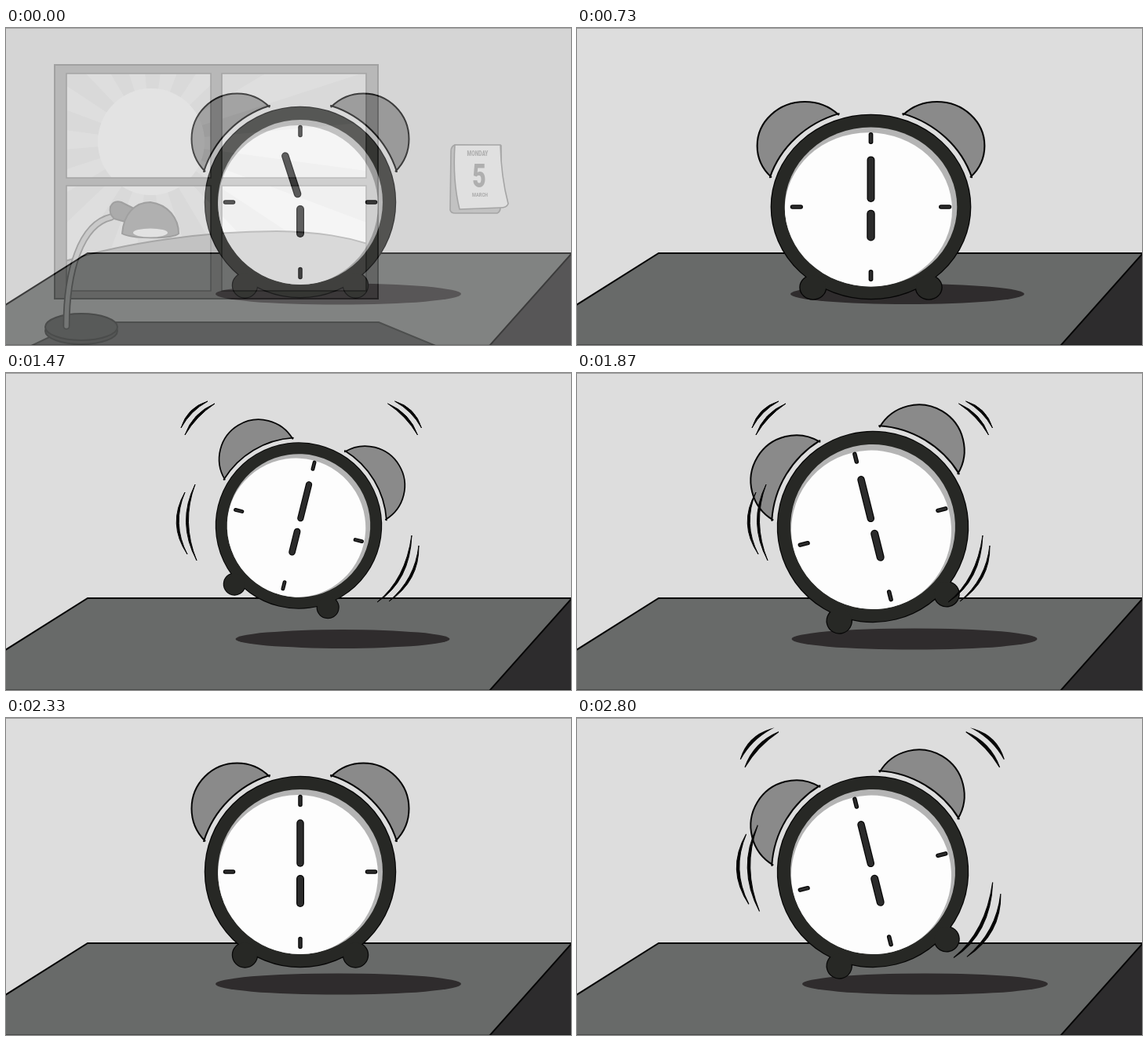
An HTML page with a canvas for the animation above (2870 ms loop, 720x404 px).

```html
<!DOCTYPE html>
<html lang="en">
<head>
<meta charset="utf-8">
<title>Ringing alarm clock</title>
<style>
  html, body { margin: 0; width: 100%; height: 100%; overflow: hidden; background: #ddd; }
  canvas { display: block; }
</style>
</head>
<body>
<canvas id="stage" width="720" height="404"></canvas>
<script>
const W = 720, H = 404, LOOP = 2870, TICK = 200 / 3;
const RAD = Math.PI / 180;
const INK = '#060606', BODY = '#272825';
const ctx = document.getElementById('stage').getContext('2d');

const grey = v => `rgb(${v},${v},${v})`;

function paint(c, fill, stroke, width = 2) {
  if (fill) { c.fillStyle = fill; c.fill(); }
  if (stroke) { c.strokeStyle = stroke; c.lineWidth = width; c.stroke(); }
}
function poly(c, points, fill, stroke, width) {
  c.beginPath();
  points.forEach(([x, y]) => c.lineTo(x, y));
  c.closePath();
  paint(c, fill, stroke, width);
}
function oval(c, x, y, rx, ry, fill, stroke, width) {
  c.beginPath();
  c.ellipse(x, y, rx, ry, 0, 0, Math.PI * 2);
  paint(c, fill, stroke, width);
}
function shape(c, path, fill, stroke, width = 2) {
  const p = new Path2D(path);
  if (fill) { c.fillStyle = fill; c.fill(p); }
  if (stroke) { c.strokeStyle = stroke; c.lineWidth = width; c.stroke(p); }
}

// Room with window, calendar and lamp that dissolves into the close-up.
function drawWindow(c) {
  c.fillStyle = grey(90);
  c.fillRect(61, 46, 414, 300);
  c.strokeStyle = grey(10);
  c.lineWidth = 2;
  c.strokeRect(62, 47, 412, 298);

  const panes = new Path2D();
  for (const x of [77, 275]) {
    panes.rect(x, 58, 184, 133);
    panes.rect(x, 201, 184, 134);
  }
  c.save();
  c.clip(panes);
  c.fillStyle = grey(228);
  c.fillRect(61, 46, 414, 300);
  for (let i = 0; i < 14; i++) {
    const a = (i + 0.3) * Math.PI / 7;
    c.beginPath();
    c.moveTo(185, 145);
    c.arc(185, 145, 420, a, a + Math.PI / 14);
    paint(c, grey(208));
  }
  oval(c, 185, 145, 68, 68, grey(244));
  shape(c, 'M60 302 C150 272 260 259 345 259 C400 260 435 266 470 278 V340 H60 Z', grey(128), grey(30));
  c.restore();
  c.strokeStyle = grey(20);
  c.lineWidth = 1.6;
  c.stroke(panes);
}

function drawCalendar(c) {
  shape(c, 'M572 149 Q567 151 567 157 L566 232 Q567 236 572 236 H626 Q630 234 630 229 L631 150 Z',
    grey(125), grey(25), 1.6);
  shape(c, 'M572 149 H630 Q631 190 640 224 Q638 229 630 229 L578 231 Q569 195 572 149 Z',
    grey(235), grey(25), 1.6);
  c.fillStyle = grey(60);
  c.textAlign = 'center';
  const label = (text, x, y, size, squeeze) => {
    c.save();
    c.translate(x, y);
    c.scale(squeeze, 1);
    c.font = `900 ${size}px Roboto, "Open Sans", sans-serif`;
    c.fillText(text, 0, 0);
    c.restore();
  };
  label('MONDAY', 601, 163, 9, 0.72);
  label('5', 603, 203, 42, 0.72);
  label('MARCH', 604, 215, 8, 0.7);
}

function drawLamp(c) {
  oval(c, 96, 386, 46, 17, grey(40), grey(0));
  oval(c, 96, 381, 46, 17, grey(50), grey(0));
  const stem = 'M77 380 C77 310 95 250 134 241';
  c.lineCap = 'round';
  shape(c, stem, null, grey(10), 9);
  shape(c, stem, null, grey(150), 5.5);
  shape(c, 'M133 228 Q137 219 147 222 L163 230 L152 247 L138 243 Q131 237 133 228 Z', grey(45), grey(5));
  shape(c, 'M148 262 C150 237 164 222 184 222 C207 225 220 243 220 262 C212 269 160 269 148 262 Z',
    grey(62), grey(5));
  oval(c, 184, 261, 22, 5.5, grey(240));
}

const room = document.createElement('canvas');
room.width = W;
room.height = H;
{
  const c = room.getContext('2d');
  c.fillStyle = grey(196);
  c.fillRect(0, 0, W, H);
  drawWindow(c);
  drawCalendar(c);
  poly(c, [[30, 406], [95, 375], [475, 375], [550, 406]], grey(70), grey(10));
  drawLamp(c);
}

function drawTable() {
  ctx.fillStyle = grey(221);
  ctx.fillRect(0, 0, W, H);
  poly(ctx, [[-4, 355], [104, 287], [724, 287], [617, 408], [-4, 408]], '#686a69', INK);
  poly(ctx, [[722, 286], [616, 405], [722, 405]], '#2d2c2d', INK);
  ctx.fillStyle = 'rgba(0,0,0,.3)';
  ctx.fillRect(0, 0, W, 1);
  ctx.fillRect(0, H - 1, W, 1);
}

function bar(x1, y1, x2, y2, width) {
  for (const [w, color] of [[width, INK], [width - 2.5, '#2b2b2b']]) {
    ctx.beginPath();
    ctx.moveTo(x1, y1);
    ctx.lineTo(x2, y2);
    paint(ctx, null, color, w);
  }
}

function drawBell(side) {
  ctx.save();
  ctx.scale(side, 1);
  ctx.beginPath();
  ctx.arc(-80.5, -80.5, 58, 135 * RAD, 315 * RAD);
  ctx.arc(0, 0, 129, 252.4 * RAD, 197.6 * RAD, true);
  ctx.closePath();
  paint(ctx, grey(138), INK);
  ctx.restore();
}

function drawClock({ x, y, sx, sy, tilt }, minute) {
  ctx.save();
  ctx.translate(x, y);
  ctx.scale(sx, sy);
  ctx.rotate(tilt * RAD);
  ctx.lineCap = 'round';
  ctx.lineJoin = 'round';
  drawBell(1);
  drawBell(-1);

  const hull = [[0, 0, 121], [-70.5, 106, 15.5], [70.5, 106, 15.5]];
  hull.forEach(([hx, hy, r]) => oval(ctx, hx, hy, r, r, null, INK, 2.5));
  hull.forEach(([hx, hy, r]) => oval(ctx, hx, hy, r, r, BODY));

  oval(ctx, 0, 0, 105, 105, grey(180));
  ctx.save();
  ctx.clip();
  oval(ctx, -3, 4, 102, 102, grey(253));
  ctx.restore();

  for (const [dx, dy] of [[0, -1], [1, 0], [0, 1], [-1, 0]])
    bar(dx * 85.5, dy * 85.5, dx * 95.5, dy * 95.5, 5.5);
  bar(0, 9, 0, 40, 10);
  ctx.rotate(minute * RAD);
  bar(0, -62, 0, -11, 9.5);
  ctx.restore();
}

// Each group: its middle, its outward step, and strokes as start, bend, end.
const SIDE = [[[228, 152], [208, 192], [231, 231]], [[241, 142], [220, 190], [243, 239]]];
const CORNER = [[[223, 70], [233, 46], [257, 36]], [[228, 79], [240, 53], [266, 39]]];
const LOWER = [[[517, 207], [512, 264], [473, 292]], [[526, 220], [524, 264], [488, 291]]];
const mirror = strokes => strokes.map(s => s.map(([x, y]) => [752.5 - x, y]));
const MARKS = [
  { mid: [244, 57], step: [-12, -19], strokes: CORNER },
  { mid: [508, 57], step: [12, -19], strokes: mirror(CORNER) },
  { mid: [235, 190], step: [-11.5, 1], strokes: SIDE },
  { mid: [500, 250], step: [10.5, 8], strokes: LOWER },
];

function drawMarks(spread) {
  for (const { mid, step, strokes } of MARKS) {
    const size = 1.13 ** spread;
    ctx.save();
    ctx.translate(mid[0] + step[0] * spread, mid[1] + step[1] * spread);
    ctx.scale(size, size);
    ctx.translate(-mid[0], -mid[1]);
    for (const [a, b, c] of strokes) {
      const dx = c[0] - a[0], dy = c[1] - a[1], len = Math.hypot(dx, dy);
      const nx = -dy / len * 3, ny = dx / len * 3;
      ctx.beginPath();
      ctx.moveTo(...a);
      ctx.quadraticCurveTo(b[0] + nx, b[1] + ny, ...c);
      ctx.quadraticCurveTo(b[0] - nx, b[1] - ny, ...a);
      paint(ctx, INK, INK, 1);
    }
    ctx.restore();
  }
}

const REST = { x: 375, y: 222, sx: 1, sy: 1, tilt: 0, shadowX: 423.5, shadowR: 156.5 };
const SQUASH = { x: 374.5, y: 228, sx: 1.046, sy: 0.967, tilt: 0, shadowX: 421, shadowR: 149 };
const JUMP = { ...REST, y: 196 };
const RIGHT = { x: 373, y: 194.5, sx: 0.869, sy: 0.869, tilt: 14, shadowX: 429, shadowR: 136.5 };
const LEFT = { x: 377, y: 196, sx: 1, sy: 1, tilt: -14, shadowX: 430, shadowR: 156.5 };

function poseAt(beat) {
  if (beat < 0) return REST;
  if (beat === 0) return SQUASH;
  if (beat === 1) return JUMP;
  const pose = beat % 4 >= 2 ? RIGHT : LEFT;
  const sway = beat % 2 ? 0 : pose === RIGHT ? 4.5 : 13.5;
  return { ...pose, shadowX: pose.shadowX + sway };
}

function draw(time) {
  const n = Math.floor((time % LOOP + 4) / TICK);
  const left = 1 - Math.min(Math.max(n - 1, 0), 6) / 6;
  const ring = n - 11;
  const beat = ring < 23 ? ring : ring - 23;
  const pose = poseAt(beat);

  drawTable();
  oval(ctx, pose.shadowX, 339, pose.shadowR, pose.shadowR * 0.087, '#2f2c2d');
  drawClock(pose, -18 * left);
  if (beat > 1) drawMarks(Math.floor((beat + 1) % 6 / 2));
  if (left > 0) {
    ctx.globalAlpha = 0.28 * left;
    ctx.drawImage(room, 0, 0);
    ctx.globalAlpha = 1;
  }
}

const start = performance.now();
function tick() {
  draw(performance.now() - start);
  requestAnimationFrame(tick);
}
tick();
</script>
</body>
</html>
```
